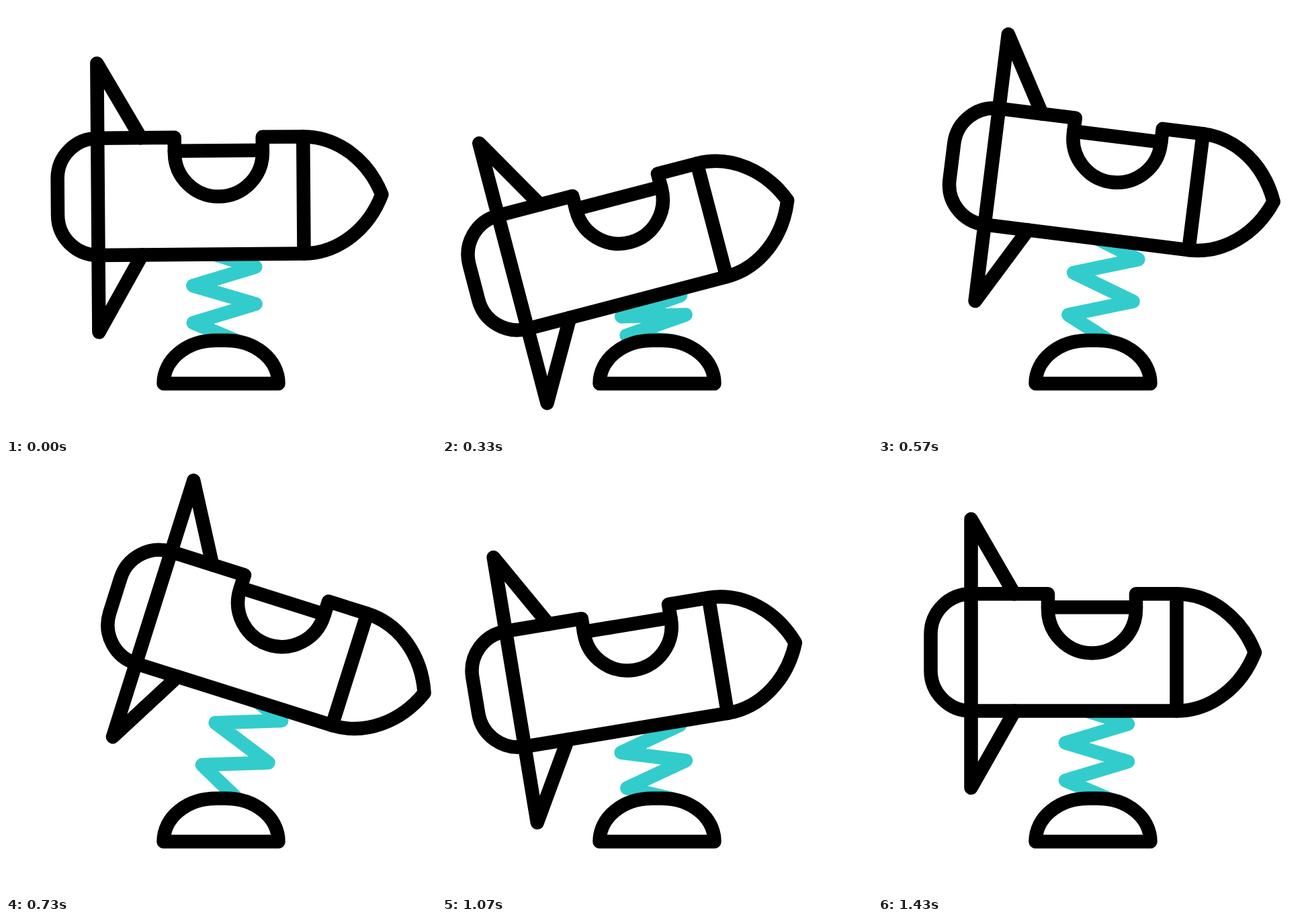
An HTML page for the animation above (1.67 s loop, 640 by 640 pixels).

```html
<!DOCTYPE html>
<html lang="en">
<head>
<meta charset="utf-8">
<title>Spring rocket</title>
<style>
  html, body { margin: 0; width: 100%; height: 100%; overflow: hidden; background: #fff; }
  svg { display: block; width: 100%; height: 100%; }
  path { fill: none; stroke: #000; stroke-width: 20.5; stroke-linecap: round; stroke-linejoin: round; }
  .solid { fill: #fff; }
  #spring { stroke: #33cccc; }
</style>
</head>
<body>
<svg viewBox="0 0 640 640">
  <path id="spring"/>
  <g id="rocket">
    <path class="solid" d="M138.5 193.3H253V216A65.5 65.5 0 0 0 384 216V193.3H444C496 193.3 541 229 561 280.4C541 331.5 496 367.5 444 367.5H138.5A60 60 0 0 1 78.5 307.5V253.3A60 60 0 0 1 138.5 193.3Z"/>
    <path d="M253 213.3H384M444.5 193.3V367.5"/>
    <path d="M203 193.3L138.5 82V482L203.5 367.5"/>
  </g>
  <path class="solid" d="M234.5 562C234.5 526 269 497.8 313 497.8H327C371 497.8 405.5 526 405.5 562Z"/>
</svg>
<script>
const LOOP = 1670;
const rocket = document.getElementById('rocket');
const spring = document.getElementById('spring');

const clamp = u => Math.min(1, Math.max(0, u));
const ease = u => u * u * (3 - 2 * u);

// Eased moves from rest, one after another: [start step, end step, value reached]
const moves = list => step => list.reduce(
  (value, [start, end, to]) => value + (to - value) * ease(clamp((step - start) / (end - start))), 0);

const tilt = moves([[-1.25, 11, -14.95], [12.4, 19.8, 17.5], [22, 33, -10], [33, 43, 0]]);
const drop = moves([[-1, 8.4, 64.8], [10.8, 18.75, -33], [19.5, 28.8, 22.2], [32, 43, 0]]);
const squash = moves([[-1, 8.4, 48.5], [10.8, 18.75, -23], [19.5, 30.3, 4.5], [32, 43, 0]]);

// Spring bends from its foot to the top, relative to the foot
const FOOT = [345, 499];
const bends = [[-66, -28], [27, -56], [-66, -84], [27, -112], [-45, -135]];
const pressed = [0.04, 0.46, 0.59, 1, 1.2];
const stretched = [0.25, 0.5, 0.75, 1, 1.2];

function draw(step) {
  const angle = tilt(step), amount = squash(step);
  const weights = amount > 0 ? pressed : stretched;
  const points = bends.map(([x, y], i) => `${x} ${y + amount * weights[i]}`);
  spring.setAttribute('d', 'M0 0L' + points.join('L'));
  spring.setAttribute('transform', `translate(${FOOT}) rotate(${angle})`);
  rocket.setAttribute('transform', `rotate(${angle} 320 499) translate(0 ${drop(step)})`);
}

// 30 steps a second, each start rounded to 10 ms
function stepAt(t) {
  const step = Math.floor((t + 10) * 0.03);
  return t < Math.round(step * 10 / 3) * 10 ? step - 1 : step;
}

function tick() {
  draw(stepAt(performance.now() % LOOP));
  requestAnimationFrame(tick);
}
tick();
</script>
</body>
</html>
```
